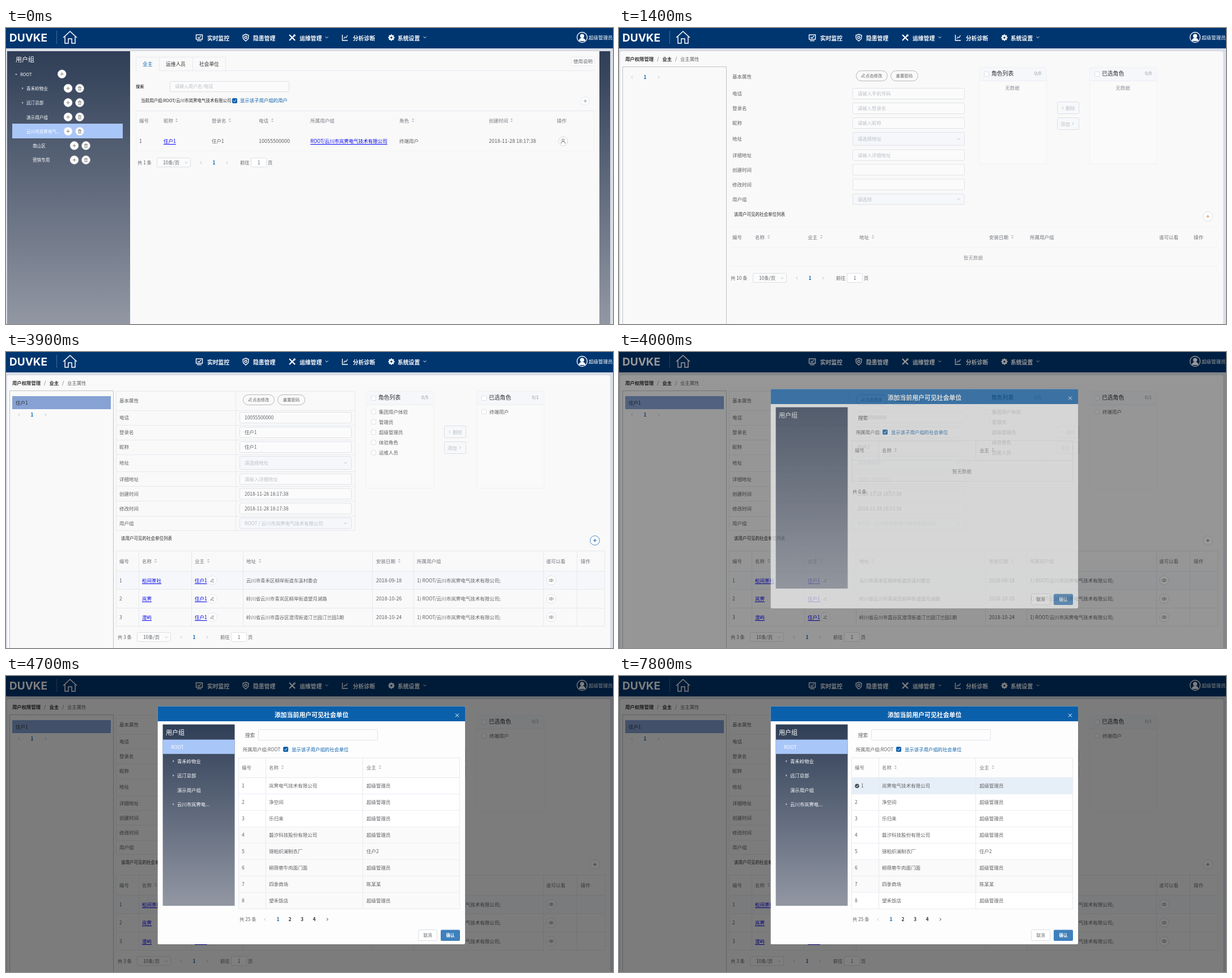
Recreate the animation shown at these times as an HTML page with a canvas. Size 1071 px wide and 523 px high, loop 8000 ms.

```html
<!DOCTYPE html>
<html lang="zh-CN">
<head>
<meta charset="utf-8">
<title>用户权限管理</title>
<style>
html,body{margin:0;width:100%;height:100%;overflow:hidden;background:#dce1e9}
canvas{display:block;width:1071px;height:523px}
</style>
</head>
<body>
<canvas id="stage" width="1071" height="523"></canvas>
<script>
const stage = document.getElementById('stage').getContext('2d');
const layer = new OffscreenCanvas(1071, 523).getContext('2d');
let c = stage;
const LOOP = 8000;
const FONT = '"Noto Sans CJK SC","Noto Sans CJK JP","Noto Sans",sans-serif';
const BLUE = '#0b60ab', INK = '#606266', PALE = '#bcc0c8', LINE = '#e6e9ef', PANEL = '#f9f9f9', LINK = '#0000ee';
const COMPANY = '岚霁电气技术有限公司';
const GROUP = '云川市' + COMPANY;
const OWNER = '住户1';
const ADMIN = '超级管理员';
const clamp = v => Math.max(0, Math.min(1, v));

function text(s, x, y, size = 8.5, color = INK, o = {}) {
  c.font = `${o.bold ? 700 : 400} ${size}px ${o.font || FONT}`;
  c.textAlign = o.align || 'left';
  c.fillStyle = color;
  c.fillText(s, x, y + size * .37);
}
const bold = (s, x, y, size, color, align) => text(s, x, y, size, color, {bold: true, align});
const center = (s, x, y, size, color) => text(s, x, y, size, color, {align: 'center'});

function fill(x, y, x2, y2, color) {
  c.fillStyle = color;
  c.fillRect(x, y, x2 - x, y2 - y);
}

function box(x, y, x2, y2, stroke, back, r = 2) {
  const inset = stroke ? .5 : 0;
  c.beginPath();
  c.roundRect(x + inset, y + inset, x2 - x - inset * 2, y2 - y - inset * 2, r);
  if (back) { c.fillStyle = back; c.fill(); }
  if (stroke) { c.strokeStyle = stroke; c.lineWidth = 1; c.stroke(); }
}

function path(points, color, width = 1, close = false) {
  c.beginPath();
  points.forEach(([x, y]) => c.lineTo(x, y));
  if (close) c.closePath();
  c.strokeStyle = color;
  c.lineWidth = width;
  c.stroke();
}
const hline = (x, x2, y, color = LINE) => fill(x, y, x2, y + 1, color);
const vline = (x, y, y2, color = LINE) => fill(x, y, x + 1, y2, color);

function disc(x, y, r, stroke, back, width = 1) {
  c.beginPath();
  c.arc(x, y, r, 0, 7);
  if (back) { c.fillStyle = back; c.fill(); }
  if (stroke) { c.strokeStyle = stroke; c.lineWidth = width; c.stroke(); }
}

function triangle(x, y, dx, dy, color) {
  c.beginPath();
  c.moveTo(x + dx, y + dy);
  c.lineTo(x - dy, y + dx);
  c.lineTo(x + dy, y - dx);
  c.fillStyle = color;
  c.fill();
}

function chevron(x, y, dx, dy, color = PALE, w = 1) {
  path([[x - dx - dy * 2, y - dy - dx * 2], [x + dx, y + dy], [x - dx + dy * 2, y - dy + dx * 2]], color, w);
}
const left = (x, y, color) => chevron(x, y, -1.2, 0, color);
const right = (x, y, color) => chevron(x, y, 1.2, 0, color);
const down = (x, y, color) => chevron(x, y, 0, 1.2, color);

function sort(x, y) {
  triangle(x, y - 1, 0, -2.2, '#b4b8c0');
  triangle(x, y + 1, 0, 2.2, '#b4b8c0');
}

function plus(x, y, r, ring = '#dcdfe6', ink = '#8a8078') {
  disc(x, y, r, ring, '#fff');
  path([[x - 3, y], [x + 3, y]], ink);
  path([[x, y - 3], [x, y + 3]], ink);
}

function trash(x, y) {
  disc(x, y, 7.3, '#dcdfe6', '#fff');
  c.strokeStyle = '#777';
  c.lineWidth = .8;
  c.strokeRect(x - 2, y - 1.5, 4, 5);
  path([[x - 3.3, y - 2], [x + 3.3, y - 2]], '#777', .8);
  path([[x - 1, y - 3.3], [x + 1, y - 3.3]], '#777', .8);
  path([[x, y], [x, y + 2.3]], '#777', .8);
}

function pen(x, y, color) {
  path([[x - 2.5, y + 1], [x + 1, y - 3], [x + 2.5, y - 1.5], [x - 1, y + 2.2], [x - 3, y + 2.6]], color, .8, true);
  path([[x, y + 3], [x + 3, y + 3]], color, .8);
}

function person(x, y, r, color) {
  disc(x, y - r * .3, r * .33, color, null, 1);
  c.beginPath();
  c.arc(x, y + r * .68, r * .6, Math.PI, 0);
  c.stroke();
}

function check(x, y, on) {
  box(x, y, x + 9, y + 9, on ? BLUE : '#dcdfe6', on ? BLUE : '#fff', 1);
  if (on) path([[x + 2, y + 4.5], [x + 4, y + 6.5], [x + 7, y + 2.5]], '#fff');
}

function link(s, x, y) {
  text(s, x, y, 8.5, LINK);
  hline(x, x + c.measureText(s).width, Math.round(y + 5), LINK);
}

function slate(x, y, x2, y2) {
  const g = c.createLinearGradient(0, y, 0, y2);
  g.addColorStop(0, '#2f3e56');
  g.addColorStop(1, '#9297a3');
  fill(x, y, x2, y2, g);
}

function pager(x, y, total) {
  text(`共 ${total} 条`, x, y, 8.3);
  if (total > 9) x += 5;
  box(x + 34, y - 9, x + 94, y + 8, '#dcdfe6', '#fbfbfb');
  text('10条/页', x + 45, y, 8.3);
  down(x + 86, y);
  left(x + 112, y);
  bold('1', x + 135, y, 8.3, BLUE, 'center');
  right(x + 158, y);
  text('前往', x + 181, y, 8.3);
  box(x + 200, y - 9, x + 228, y + 8, '#dcdfe6', '#fff');
  center('1', x + 214, y, 8.3);
  text('页', x + 230, y, 8.3);
}

function navIcon(kind, x) {
  const y = 17, w = '#fff';
  if (kind === 0) {
    c.strokeStyle = w; c.lineWidth = 1.4;
    c.strokeRect(x - 5.5, y - 5, 11, 8);
    path([[x - 4, y + 5.5], [x + 4, y + 5.5]], w, 1.4);
    path([[x - 3, y - 1], [x - .5, y + 1], [x + 3, y - 3]], w, 1.2);
  } else if (kind === 1) {
    path([[x, y - 6], [x + 5, y - 4], [x + 4.5, y + 2], [x, y + 6], [x - 4.5, y + 2], [x - 5, y - 4]], w, 1.4, true);
    disc(x, y - .5, 2, w, null, 1.3);
  } else if (kind === 2) {
    path([[x - 5, y - 5], [x + 5, y + 5]], w, 2.2);
    path([[x + 4, y - 4], [x - 5, y + 5]], w, 2.2);
    disc(x + 4, y - 4, 1.5, w);
  } else if (kind === 3) {
    path([[x - 4.5, y - 5], [x - 4.5, y + 5], [x + 5, y + 5]], w, 1.4);
    path([[x - 2, y + 2], [x, y - 1], [x + 2, y], [x + 4.5, y - 4]], w, 1.3);
  } else {
    for (let i = 0; i < 8; i++) {
      const a = i * Math.PI / 4;
      path([[x, y], [x + 5.6 * Math.cos(a), y + 5.6 * Math.sin(a)]], w, 2.4);
    }
    disc(x, y, 3, w, '#003670', 2.4);
  }
}

function header() {
  fill(0, 0, 1071, 523, '#d8dde6');
  fill(0, 0, 1071, 36, '#003670');
  text('DUVKE', 6, 16.5, 19, '#fff', {bold: true, font: 'Inter,"Liberation Sans",sans-serif'});
  vline(89, 5, 28, '#466a94');
  path([[101, 17], [113, 6], [125, 17]], '#fff', 1.5);
  path([[104, 15], [104, 27], [110, 27], [110, 19], [116, 19], [116, 27], [122, 27], [122, 15]], '#fff', 1.5);
  [['实时监控', 341, 355], ['隐患管理', 423, 436], ['运维管理', 505, 518], ['分析诊断', 598, 612], ['系统设置', 680, 691]]
    .forEach(([s, ix, x], i) => { navIcon(i, ix); bold(s, x, 18, 9.8, '#fff'); });
  down(566, 16.5, '#fff');
  down(739, 16.5, '#fff');
  disc(1016.5, 16.5, 9, '#fff', null, 1.3);
  disc(1016.5, 14, 3.6, null, '#fff');
  c.beginPath();
  c.arc(1016.5, 23, 5.8, Math.PI, 0);
  c.fillStyle = '#fff';
  c.fill();
  text(ADMIN, 1028, 17, 8.5, '#fff');
}

function listPage() {
  slate(2, 41, 1066, 523);
  fill(219, 41, 1047, 523, PANEL);
  text('用户组', 17, 55.5, 11, '#fff');
  fill(11, 169, 206, 195, '#a9c6f8');
  const nodes = [['ROOT', 25, 1], ['青禾岭物业', 36, 1], ['远汀总部', 36, 1], ['演示用户组', 36],
    [GROUP.slice(0, 7) + '...', 36], ['南山区', 47], ['营销专用', 47]];
  nodes.forEach(([s, x, arrow], i) => {
    const y = 81.3 + i * 25.3;
    text(s, x, y + .5, 7.6, '#fff');
    if (arrow) i ? triangle(x - 7.5, y, 2, 0, '#dde') : triangle(x - 7, y, 0, 2, '#dde');
    const bx = i ? x + 73.5 : 98.7;
    plus(bx, y, 7.3);
    if (i) trash(bx + 20.5, y);
  });

  box(229, 51, 388, 76, LINE, null, 2);
  hline(229, 1038, 75);
  vline(270, 51, 75);
  vline(329, 51, 75);
  hline(230, 270, 75, PANEL);
  text('业主', 241, 63.5, 8.7, BLUE);
  text('运维人员', 282, 63.5, 8.7, '#303133');
  text('社会单位', 341, 63.5, 8.7, '#303133');
  box(997, 51, 1039, 67, LINE, '#fff');
  text('使用说明', 1001, 59, 8.5);

  text('搜索', 229, 103.5, 7.3, '#000');
  box(289, 94, 500, 113, '#dcdfe6', '#fbfbfb');
  text('请输入用户名/电话', 298, 103.5, 8, PALE);
  text('当前用户组:ROOT/' + GROUP, 238, 128.5, 7.5, '#222');
  check(399, 124, true);
  text('显示该子用户组的用户', 413, 128, 8.4, BLUE);
  plus(1022, 129, 7.3, LINE, '#8aa0b5');

  hline(229, 1038, 146);
  vline(229, 146, 217, '#f0f1f4');
  vline(1037, 146, 217, '#f0f1f4');
  [['编号', 235], ['昵称', 278, 301], ['登录名', 363, 395], ['电话', 446, 470], ['所属用户组', 537],
    ['角色', 694, 718], ['创建时间', 852, 892], ['操作', 972]].forEach(([s, x, sx]) => {
    text(s, x, 163.5, 8.5, '#777b82');
    if (sx) sort(sx, 163);
  });
  text('1', 235, 200, 9);
  link(OWNER, 278, 200);
  text(OWNER, 363, 200, 8.5);
  text('10055500000', 446, 200, 9);
  link('ROOT/' + GROUP, 537, 200);
  text('终端用户', 694, 200);
  text('2018-11-28 18:17:38', 852, 200, 9);
  disc(983, 200, 8, '#d5d8de', '#fff');
  person(983, 200, 6.5, '#777');
  hline(229, 1038, 217, '#f2f3f6');
  pager(232, 238, 1);
}

function field(label, value, hint, y, half = 10, select = false) {
  text(label, 200, y, 8.5);
  box(412, y - half, 610, y + half, '#dfe2e8', select ? '#f5f7fa' : '#fbfbfb');
  text(value || hint, 421, y, 8.4, value ? INK : PALE);
  if (select) down(599, y);
}

function transfer(x, title, count, items) {
  box(x, 69, x + 120, 241, '#f1f2f5', '#fafafa');
  fill(x + 1, 70, x + 119, 93, '#f5f7fa');
  hline(x, x + 120, 93, '#ebeef5');
  check(x + 9, 77);
  text(title, x + 22, 80.5, 9.8, '#303133');
  text(count, x + 98, 80, 8, '#909399');
  if (!items.length) center('无数据', x + 59, 105.5, 8.5, '#909399');
  items.forEach((s, i) => {
    check(x + 9, 101 + i * 18.1);
    text(s, x + 23, 105.5 + i * 18.1, 8.5);
  });
}

function detailPage(t) {
  const loaded = t >= 1600, rows = t >= 1900;
  const grid = clamp((t - 1400) / 400);
  box(2, 41, 1066, 540, null, PANEL, 4);
  bold('用户权限管理', 11, 55, 8.4, '#303133');
  text('/', 67, 55, 8.4);
  bold('业主', 76.5, 55, 8.4, '#303133');
  text('/', 99, 55, 8.4);
  text('业主属性', 108, 55, 8.4);

  box(6, 68, 190, 540, '#bfc2c7', null, 0);
  if (loaded) {
    fill(11, 78, 185, 101, '#86a1d3');
    text(OWNER, 17, 90, 8.5, '#303133');
  }
  const py = loaded ? 111 : 87;
  left(23, py);
  bold('1', 46, py, 8.3, BLUE, 'center');
  right(70, py);

  c.globalAlpha = grid;
  [69, 103, 129, 155, 181, 211, 237, 263, 290, 315].forEach(y => hline(194, 616, y));
  [194, 405, 615].forEach(x => vline(x, 69, 315));
  c.globalAlpha = 1;
  text('基本属性', 200, 85.5);
  box(418, 75, 474, 94, '#b5b8be', PANEL, 9);
  pen(431, 84, INK);
  text('点击修改', 435, 84.5, 7.3);
  box(479, 75, 528, 94, '#b5b8be', PANEL, 9);
  text('重置密码', 488.5, 84.5, 7.4);
  const stamp = loaded && '2018-11-28 18:17:38';
  field('电话', loaded && '10055500000', '请输入手机号码', 116);
  field('登录名', loaded && OWNER, '请输入登录名', 142);
  field('昵称', loaded && OWNER, '请输入昵称', 168);
  field('地址', '', '请选择地址', 196, 12, true);
  field('详细地址', '', '请输入详细地址', 224.5);
  field('创建时间', stamp, '', 250.5);
  field('修改时间', stamp, '', 276.5);
  field('用户组', '', loaded ? 'ROOT / ' + GROUP : '请选择', 302.5, 10, true);

  transfer(635, '角色列表', loaded ? '0/5' : '0/0',
    loaded ? ['集团用户体验', '管理员', ADMIN, '体验角色', '运维人员'] : []);
  transfer(830, '已选角色', loaded ? '0/1' : '0/0', loaded ? ['终端用户'] : []);
  box(773, 130, 812, 152, '#dcdfe6', '#f7f8fa');
  left(783, 141);
  text('删除', 788, 141.5, 8.4, PALE);
  box(773, 158, 812, 180, '#dcdfe6', '#f7f8fa');
  text('添加', 779, 169.5, 8.4, PALE);
  right(801, 169);

  text('该用户可见的社会单位列表', 203, 329.5, 7.5, '#222');
  const hot = t >= 3600 && t < 4000;
  plus(1039, 333, 8.3, hot ? '#4d8bc2' : '#dcdfe6', hot ? BLUE : t < 1800 ? '#e0914f' : '#777');

  if (rows) {
    if (t >= 2600) fill(194, 387, 1056, 420, '#f5f7fa');
    [351, 387, 419, 452, 484].forEach(y => hline(194, 1056, y));
    [194, 234, 327, 418, 646, 719, 948, 1007, 1056].forEach(x => vline(x, 351, 485));
  } else {
    c.globalAlpha = .3 + grid * .5;
    [351, 387, 420].forEach(y => hline(194, 1056, y));
    c.globalAlpha = 1;
  }
  [['编号', 200], ['名称', 240, 264], ['业主', 333, 357], ['地址', 424, 448], ['安装日期', 653, 694],
    ['所属用户组', 725], ['谁可以看', 953], ['操作', 1014]].forEach(([s, x, sx]) => {
    text(s, x, 369.5, 8.5, '#70747b');
    if (sx) sort(sx, 369);
  });
  if (!rows) {
    center('暂无数据', 625, 406, 8.5, '#909399');
    pager(197, 442, 10);
    return;
  }
  [['松间茶社', '云川市青禾区柳岸街道东溪村委会', '2018-09-18'],
    ['岚霁', '岭川省云川市青岚区柳岸街道望月湖路', '2018-10-26'],
    ['澄屿', '岭川省云川市霞谷区澄湾街道汀兰园汀兰园1期', '2018-10-24']].forEach(([name, place, date], i) => {
    const y = 403.5 + i * 32.5;
    text(`${i + 1}`, 200, y);
    link(name, 240, y);
    link(OWNER, 333, y);
    const over = i === 0 && t >= 2800 && t < 2900;
    disc(364, y, 8, over ? BLUE : '#e4e7ec', '#fff');
    pen(364, y, over ? BLUE : INK);
    text(place, 424, y, 8.4);
    text(date, 653, y, 8.8);
    text(`1) ROOT/${GROUP};`, 725, y, 8.5);
    disc(962, y, 8.2, '#dcdfe6', '#fff');
    c.beginPath();
    c.ellipse(962, y, 3.8, 2.4, 0, 0, 7);
    c.strokeStyle = '#777';
    c.lineWidth = .8;
    c.stroke();
    disc(962, y, 1, '#777', null, .8);
  });
  pager(197, 504, 3);
}

function modal(t) {
  const full = t >= 4600, tree = t >= 4100, picked = t >= 5500;
  const top = full ? 54 : tree ? 70 : 66;
  const bottom = top + (full ? 420 : 387);
  const at = dy => top + dy;
  box(267.7, top - .4, 810, bottom, null, full ? '#fdfdfd' : PANEL, 2);
  box(267.7, top - .4, 810, at(26), null, BLUE, [2, 2, 0, 0]);
  bold('添加当前用户可见社会单位', 539, at(15), 10.9, '#fff', 'center');
  path([[793, at(12.5)], [799, at(18.5)]], '#fff');
  path([[799, at(12.5)], [793, at(18.5)]], '#fff');

  slate(276.6, at(31.6), 403.5, at(352));
  text('用户组', 282, at(45.5), 11, '#fff');
  if (tree) {
    fill(276.6, at(58.4), 403.5, at(83.7), '#a9c6f8');
    text('ROOT', 291, at(71.5), 8.4, '#fff');
    ['青禾岭物业', '远汀总部', '演示用户组', GROUP.slice(0, 6) + '...'].forEach((s, i) => {
      const y = at(97 + i * 25.3);
      text(s, 302, y, 8.4, '#fff');
      if (i !== 2) triangle(294.5, y - .5, 2, 0, '#dde');
    });
  }

  text('搜索', 422, at(51), 8.6);
  if (tree) box(445, at(40), 656, at(60), '#e0e3e8', null);
  const shift = tree ? 0 : -24;
  text('所属用户组:' + (tree ? 'ROOT' : ''), 418, at(75.5), 8.3);
  check(489 + shift, at(71), true);
  text('显示该子用户组的社会单位', 504 + shift, at(75.5), 8.4, BLUE);

  const end = full ? 357 : 162;
  if (full) fill(410, at(126), 801, at(end), '#fff');
  if (picked) fill(410, at(126), 801, at(154), '#e6eef7');
  if (t >= 5700 && t < 6600) fill(410, at(183), 801, at(212), '#f5f7fa');
  if (full) fill(410, at(t < 7300 ? 212 : 270), 801, at(t < 7300 ? 357 : 328), '#fafafa');
  hline(410, 801, at(90));
  hline(410, 801, at(125));
  hline(410, 801, at(end));
  [410, 458, 629, 800].forEach((x, i) => vline(x, at(90), at(full || i % 3 === 0 ? end : 126)));
  text('编号', 416, at(107.5), 8.5, '#70747b');
  text('名称', 464, at(107.5), 8.5, '#70747b');
  sort(488, at(107));
  text('业主', 636, at(107.5), 8.5, '#70747b');
  sort(660, at(107));

  if (full) {
    [COMPANY, '净空间', '乐归来', '磐汐科技股份有限公司', '锦柏织澜制衣厂', '柳荫巷牛肉面门面', '四季商场', '望禾饭店']
      .forEach((name, i) => {
        const y = at(140.3 + i * 28.9);
        const mark = picked && i === 0;
        if (mark) {
          disc(420, y, 3.8, null, '#4b4f57');
          path([[418, y], [419.5, y + 1.5], [422, y - 1.3]], '#fff');
        }
        text(`${i + 1}`, mark ? 427 : 416, y);
        text(name, 464, y, 8.5);
        text(i === 4 ? '住户2' : i === 6 ? '陈某某' : ADMIN, 636, y, 8.5);
        if (i < 7) hline(410, 801, Math.round(y + 14), '#ebeef5');
      });
    text('共 25 条', 412, 430, 8.3);
    left(457, 430);
    [480, 501, 522.5, 544].forEach((x, i) => bold(`${i + 1}`, x, 430, 8.3, i ? '#303133' : BLUE, 'center'));
    right(567, 430, '#444');
  } else {
    center('暂无数据', 605, at(144.5), 8.5, '#808389');
    text('共 0 条', 412, at(181), 8.3);
    left(452, at(181));
    right(477, at(181));
  }

  const by = bottom - 25.5;
  box(727, by - .5, 761, by + 19.5, '#dcdfe6', '#fff');
  center('取消', 744, by + 10, 7.5);
  box(767, by, 801, by + 19.5, null, '#3f80bb');
  c.globalAlpha = t < 7800 ? clamp((t - 5400) / 400) : 0;
  box(767, by, 801, by + 19.5, null, BLUE);
  c.globalAlpha = 1;
  bold('确认', 784, by + 10, 7.5, '#fff', 'center');
}

// The dialog fades in as one layer.
function showModal(t) {
  const fading = t < 4100;
  fill(0, 0, 1071, 523, `rgba(0,0,0,${fading ? .4 : .5})`);
  c = layer;
  c.clearRect(0, 0, 1071, 523);
  modal(t);
  c = stage;
  c.globalAlpha = fading ? .65 : 1;
  c.drawImage(layer.canvas, 0, 0);
  c.globalAlpha = 1;
}

function draw(t) {
  header();
  if (t < 1400) listPage();
  else detailPage(t);
  if (t >= 4000) showModal(t);
}

const start = performance.now();
function tick() {
  const t = (performance.now() - start) % LOOP;
  draw(Math.floor(t / 100) * 100);
  requestAnimationFrame(tick);
}
tick();
</script>
</body>
</html>
```
